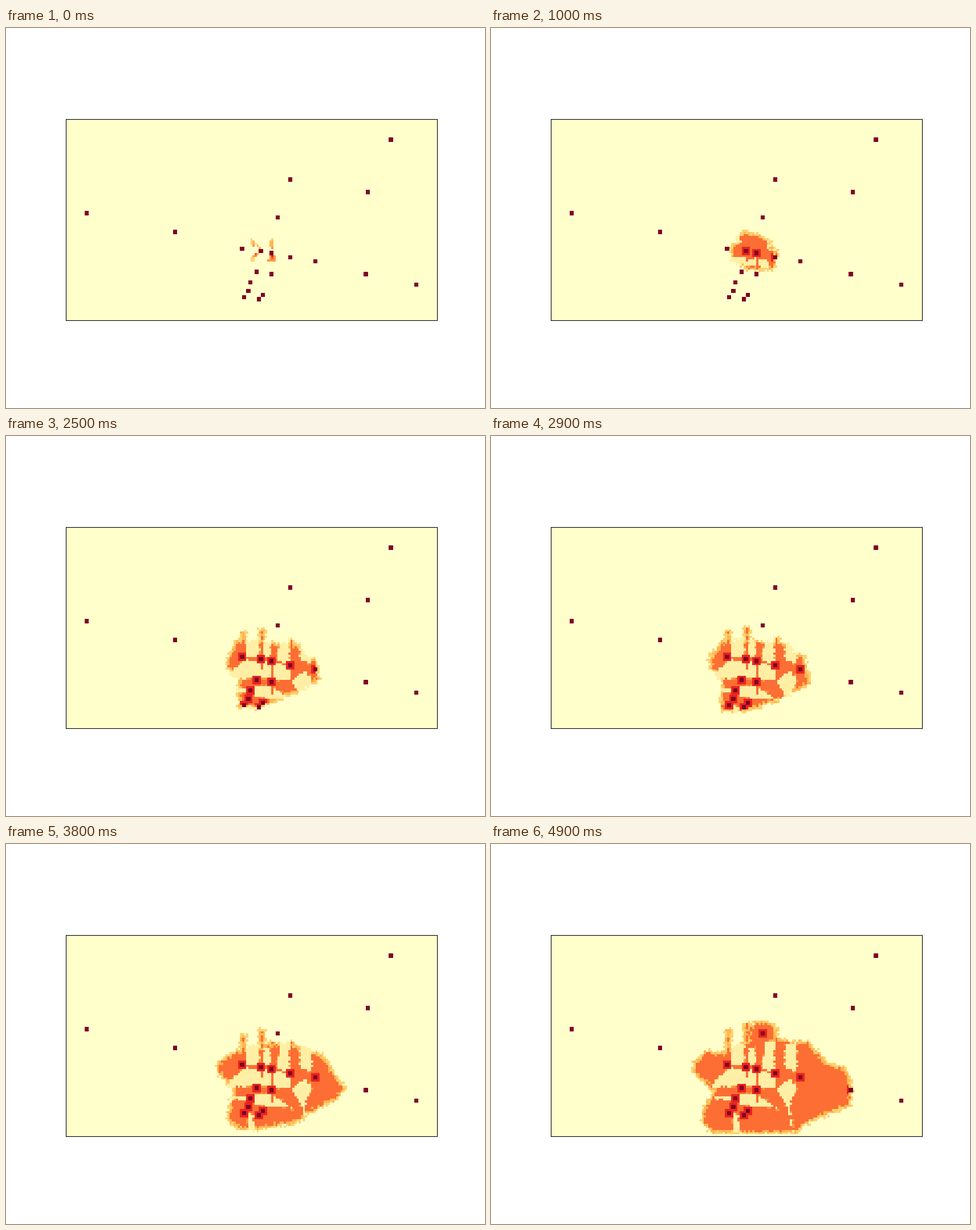
A matplotlib script that plays this animation: 840 by 667 pixels, repeating every 5 s.

```python
import numpy as np
import matplotlib.pyplot as plt
from matplotlib.animation import FuncAnimation
from matplotlib.path import Path

COLS, ROWS = 177, 96
CELL = 651 / COLS
LEFT, TOP = 105, 160.3
FRAMES, INTERVAL = 50, 100

# Levels on the colour map
PALE, RIM, MID, DEEP, BODY, HALO, FOOD = 0.11, 0.27, 0.36, 0.46, 0.56, 0.72, 1.0

# Top-left cells of the 2 x 2 food squares
FOODS = [(9, 44), (51, 53), (100, 46), (106, 28), (143, 34), (154, 9), (83, 61),
         (92, 62), (97, 63), (106, 65), (118, 67), (90, 72), (97, 73), (142, 73),
         (87, 77), (86, 81), (84, 84), (93, 83), (91, 85), (166, 78)]

# Starting colony: column, row, width, height, level
SEEDS = [(88, 57, 1, 3, RIM), (89, 58, 1, 2, MID), (91, 60, 1, 1, MID),
         (91, 64, 1, 1, MID), (89, 65, 2, 1, DEEP), (88, 66, 2, 2, RIM),
         (98, 57, 1, 1, RIM), (97, 58, 2, 3, MID), (97, 65, 3, 2, DEEP),
         (96, 67, 4, 1, DEEP)]
SEED_DOTS = {(89, 60): DEEP, (90, 59): RIM, (92, 61): MID, (90, 64): 0.6,
             (98, 61): DEEP, (98, 65): HALO, (98, 66): 0.6}

gx, gy = np.meshgrid(LEFT + (np.arange(COLS) + 0.5) * CELL,
                     TOP + (np.arange(ROWS) + 0.5) * CELL)
rng = np.random.default_rng(12)
edge_noise = rng.uniform(-0.8, 0.8, gx.shape)
speckle = rng.random(gx.shape)


def segment_distance(x0, y0, x1, y1):
    dx, dy = x1 - x0, y1 - y0
    u = ((gx - x0) * dx + (gy - y0) * dy) / max(dx * dx + dy * dy, 1e-9)
    u = np.clip(u, 0, 1)
    return np.hypot(gx - x0 - u * dx, gy - y0 - u * dy)


def depth(*points):
    """Signed distance in cells, positive inside the polygon."""
    loop = points + points[:1]
    dist = np.min([segment_distance(*a, *b) for a, b in zip(loop, loop[1:])], axis=0)
    centres = np.column_stack([gx.ravel(), gy.ravel()])
    inside = Path(loop).contains_points(centres).reshape(gx.shape)
    return np.where(inside, dist, -dist) / CELL


def box(x0, y0, x1, y1):
    return depth((x0, y0), (x1, y0), (x1, y1), (x0, y1))


times = [0, 1000, 2500, 4900]
colony = [
    depth((429, 370), (448, 388), (467, 370), (473, 409), (447, 394), (429, 409)),
    depth((443, 355), (470, 362), (494, 377), (502, 410), (499, 426), (452, 428),
          (420, 409), (420, 386), (433, 366)),
    depth((404, 358), (443, 360), (500, 366), (516, 366), (526, 386), (546, 390),
          (551, 430), (503, 456), (440, 480), (406, 478), (405, 430), (386, 408),
          (386, 390)),
    depth((404, 366), (426, 354), (475, 336), (530, 346), (556, 344), (590, 382),
          (624, 394), (635, 430), (632, 460), (598, 474), (545, 498), (528, 522),
          (400, 522), (368, 490), (370, 466), (388, 436), (352, 402), (354, 382),
          (376, 362))]

# Areas that drain to a pale tone
drained = np.max([
    box(421, 352, 445, 388), box(452, 358, 464, 388), box(424, 475, 435, 506),
    box(394, 443, 424, 449),
    depth((482, 348), (497, 350), (497, 396), (486, 402), (476, 392)),
    depth((516, 352), (536, 350), (537, 402), (515, 392)),
    depth((417, 394), (480, 398), (498, 408), (498, 430), (440, 424), (388, 430),
          (388, 422)),
    depth((436, 442), (465, 438), (503, 464), (434, 459)),
    depth((502, 430), (524, 414), (537, 426), (524, 460), (530, 508), (516, 456)),
], axis=0)


def food_point(index):
    col, row = FOODS[index]
    return LEFT + (col + 1.5) * CELL, TOP + (row + 1) * CELL


# Veins link one row of foods and run upwards from four of them
chain = [food_point(i) for i in range(6, 11)]
links = [segment_distance(*a, *b) for a, b in zip(chain, chain[1:])]
rises = [segment_distance(x, y, x, y - 75) for x, y in chain[:4]]
falls = [segment_distance(x, y, x, y + drop)
         for (x, y), drop in zip(chain[1:], (18, 58, 28))]
vein = np.min(links + rises + falls, axis=0) < 0.5 * CELL

# Height of the tip of each rising tower at the key times
TIPS = [(390, 387, 344, 322), (390, 355, 338, 312),
        (390, 375, 364, 330), (390, 395, 356, 336)]


def colony_depth(now):
    i = min(np.searchsorted(times, now, side="right") - 1, 2)
    u = (now - times[i]) / (times[i + 1] - times[i])
    inner = (1 - u) * colony[i] + u * colony[i + 1]
    radius = min(7, now / 250)
    for (x, _), tips in zip(chain, TIPS):
        tip = np.interp(now, times, tips) + radius
        inner = np.maximum(inner, (radius - segment_distance(x, tip, x, 392)) / CELL)
    if now > 4300:
        bulge = 8 + (now - 4300) / 37
        inner = np.maximum(inner, (bulge - np.hypot((gx - 476) / 1.2, gy - 334)) / CELL)
    return np.minimum(inner, (510 - gy) / CELL)


def grid_at(frame):
    grid = np.zeros((ROWS, COLS))
    if frame == 0:
        for x, y, w, h, level in SEEDS:
            grid[y:y + h, x:x + w] = level
        for (x, y), level in SEED_DOTS.items():
            grid[y, x] = level
    else:
        now = frame * INTERVAL
        inner = colony_depth(now)
        rough = inner + edge_noise
        hollow = drained + 0.4 * edge_noise - 2.2 * np.clip((2500 - now) / 1500, 0, 1)
        grid[rough > 0] = RIM
        grid[rough > 0.9] = MID
        grid[rough > 1.7] = BODY
        grid[(grid == BODY) & (hollow > -0.8) & (speckle < 0.25)] = DEEP
        grid[(rough > 0) & (hollow > 0)] = PALE
        grid[vein & (inner > 0.8) & (hollow > -1)] = BODY
        for x, y in FOODS:
            ring = np.s_[y - 1:y + 3, x - 1:x + 3]
            grid[ring] = np.where(inner[ring] > 1.5, HALO, grid[ring])
    for x, y in FOODS:
        grid[y:y + 2, x:x + 2] = FOOD
    grid[-1] = 0
    return grid


fig, ax = plt.subplots(figsize=(8.4, 6.67), dpi=100)
image = ax.imshow(grid_at(0), cmap="YlOrRd", vmin=0, vmax=1, interpolation="nearest")
ax.set_xticks([])
ax.set_yticks([])


def draw(frame):
    image.set_data(grid_at(frame))
    return [image]


animation = FuncAnimation(fig, draw, frames=FRAMES, interval=INTERVAL, repeat=True)
plt.show()
```
